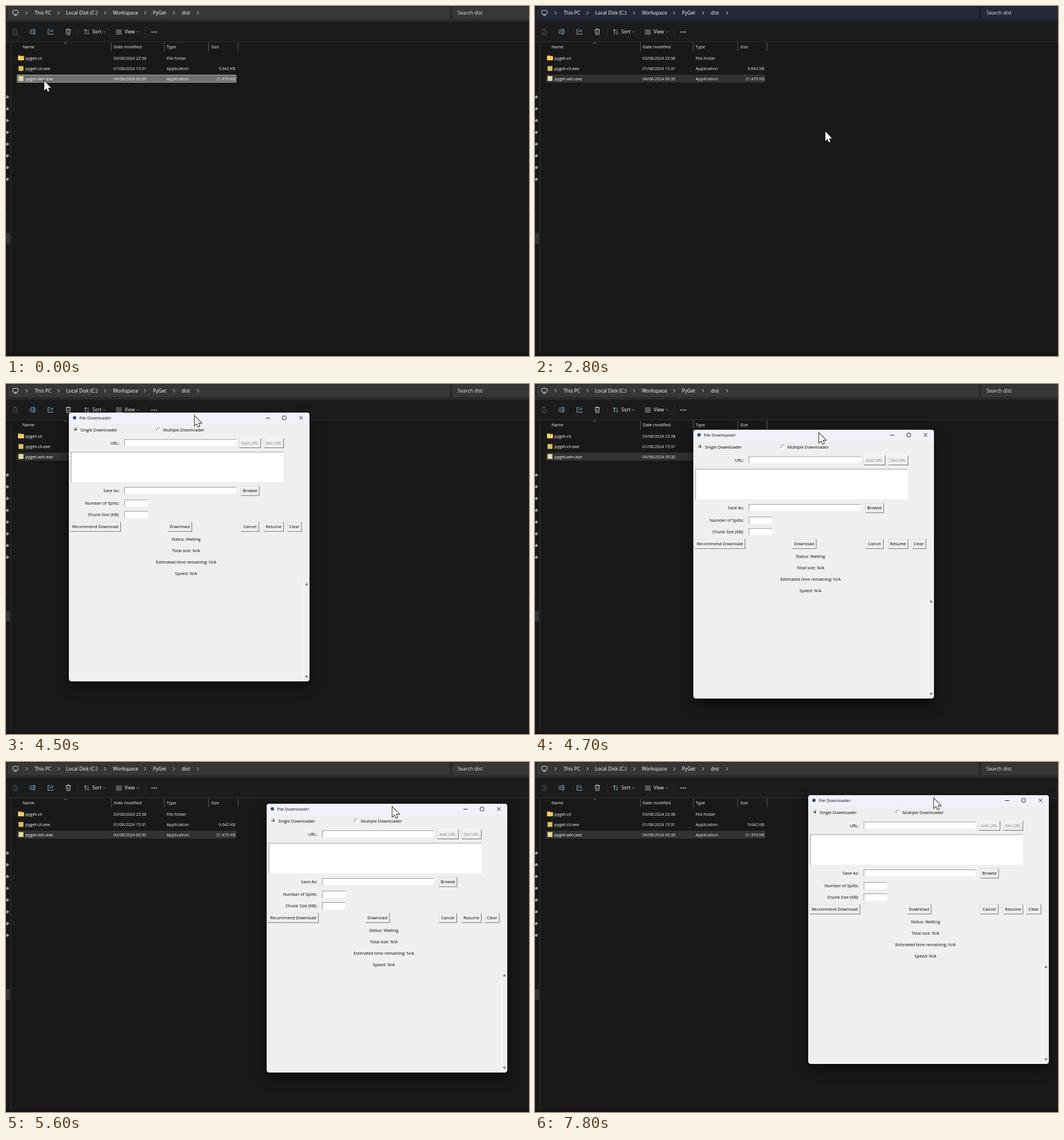
Recreate the animation shown at these times as an HTML page with a canvas. Size 915 by 612 pixels, loop 8 s.

```html
<!DOCTYPE html>
<html lang="en">
<head>
<meta charset="utf-8">
<title>File Downloader</title>
<style>
html, body { margin: 0; width: 100%; height: 100%; overflow: hidden; background: #191919; }
canvas { display: block; }
</style>
</head>
<body>
<canvas width="915" height="612"></canvas>
<script>
const c = document.querySelector('canvas').getContext('2d');
const LOOP = 8000, STEP = 100, WIN_W = 421, WIN_H = 470;

// Keyframes: [ms, x, y]
const windowPath = [[4200, -87.5, 10.5], [4300, -55, 17], [4500, 110, 50], [4700, 277, 80],
  [4900, 350, 80], [5100, 386, 79], [5300, 408, 78], [5600, 456, 73], [5800, 482, 70],
  [6000, 490, 71.5], [6300, 490, 72], [6600, 482.5, 66.5], [7500, 482.5, 66.5], [7800, 478, 58]];
const cursorPath = [[500, 67, 131], [700, 190, 150], [900, 410, 192], [1100, 500, 206],
  [1200, 500, 206], [1500, 508, 212], [2700, 508, 212], [2800, 508, 219.5], [3000, 495, 213],
  [3300, 330, 130], [3600, 166, 45], [3900, 133, 20], [4100, 134, 19], [4200, 134, 18]];

function along(path, t) {
  const i = path.findIndex(p => p[0] > t);
  if (i === 0) return path[0].slice(1);
  if (i < 0) return path[path.length - 1].slice(1);
  const a = path[i - 1], b = path[i], k = (t - a[0]) / (b[0] - a[0]);
  return [a[1] + (b[1] - a[1]) * k, a[2] + (b[2] - a[2]) * k];
}

const ramp = (t, a, b) => Math.min(1, Math.max(0, (t - a) / (b - a)));
const mix = (a, b, k) => `rgb(${a.map((v, i) => Math.round(v + (b[i] - v) * k))})`;

function rect(x, y, w, h, color) {
  c.fillStyle = color;
  c.fillRect(x, y, w, h);
}

function round(x, y, w, h, r, color) {
  c.fillStyle = color;
  c.beginPath();
  c.roundRect(x, y, w, h, r);
  c.fill();
}

function line(points, color, width = 1, close = false) {
  c.strokeStyle = color;
  c.lineWidth = width;
  c.beginPath();
  for (let i = 0; i < points.length; i += 2) c.lineTo(points[i], points[i + 1]);
  if (close) c.closePath();
  c.stroke();
}

function shape(points, color) {
  c.fillStyle = color;
  c.beginPath();
  for (let i = 0; i < points.length; i += 2) c.lineTo(points[i], points[i + 1]);
  c.fill();
}

function dot(x, y, r, color) {
  c.fillStyle = color;
  c.beginPath();
  c.arc(x, y, r, 0, 7);
  c.fill();
}

// y is the middle of the capitals
function text(s, x, y, size, color, align = 'left') {
  c.font = `${size}px "Open Sans", "Noto Sans", sans-serif`;
  c.fillStyle = color;
  c.textAlign = align;
  c.fillText(s, x, y + size * 0.36);
}

function outline(x, y, w, h, color) {
  c.strokeStyle = color;
  c.lineWidth = 1;
  c.beginPath();
  c.roundRect(x, y, w, h, 1.5);
  c.stroke();
}

function topBar(blue) {
  const field = mix([55, 55, 55], [37, 41, 54], blue);
  rect(0, 0, 915, 27, mix([43, 43, 43], [28, 32, 45], blue));
  round(4, 1, 772, 22, 3, field);
  round(781, 1, 140, 22, 3, field);
  outline(12, 7.5, 9, 7, '#ddd');
  line([14, 16.5, 19, 16.5], '#ddd');
  for (const x of [36, 92, 173.5, 243.5, 294, 336])
    line([x - 1.5, 9.2, x + 1.3, 12, x - 1.5, 14.8], '#ddd');
  const crumbs = [['This PC', 50], ['Local Disk (C:)', 105], ['Workspace', 187], ['PyGet', 257], ['dist', 307.5]];
  for (const [s, x] of crumbs) text(s, x, 12.3, 8.6, '#fff');
  text('Search dist', 790, 12.3, 8.6, '#e4e4e4');
}

function toolBar() {
  rect(0, 27, 915, 36, '#1c1c1c');
  rect(0, 27, 915, 1, '#232323');
  rect(0, 62, 915, 1, '#303030');
  outline(12, 41, 7, 9, '#4c4c4c');
  rect(14, 40, 3, 2, '#4c4c4c');
  outline(15.5, 44.5, 4.5, 6, '#34495f');

  outline(42, 41.5, 9, 7, '#5c9cc8');
  text('A', 43.3, 45, 6, '#ccc');
  line([49, 39.5, 49, 50.5], '#78b4dc');

  line([77, 41, 73.5, 41, 73.5, 49.5, 82, 49.5, 82, 47], '#8fa9bb');
  line([76, 47, 77, 44, 82, 43], '#5c9cc8');
  line([79.5, 40.5, 82.3, 43, 79.5, 45.5], '#5c9cc8');

  line([104.5, 41.5, 113.5, 41.5], '#ccc');
  line([107.5, 41, 107.5, 39.8, 110.5, 39.8, 110.5, 41], '#ccc', 0.8);
  line([105.5, 42, 106.3, 50, 111.7, 50, 112.5, 42], '#ccc');
  line([108, 44, 108, 48], '#ccc', 0.7);
  line([110, 44, 110, 48], '#ccc', 0.7);

  rect(126, 36, 1, 19, '#2d2d2d');
  line([139, 49.5, 139, 41], '#ccc');
  line([136.8, 43.2, 139, 41, 141.2, 43.2], '#ccc');
  line([143.5, 41, 143.5, 49.5], '#5c9cc8');
  line([141.3, 47.3, 143.5, 49.5, 145.7, 47.3], '#5c9cc8');
  text('Sort', 151, 45.3, 8.3, '#fff');
  for (let y = 41.5; y < 50; y += 2.4) rect(192.5, y, 10, 0.9, '#bbb');
  text('View', 207.5, 45.3, 8.3, '#fff');
  for (const x of [172, 230.5]) line([x - 2, 44.2, x, 46.2, x + 2, 44.2], '#999', 0.9);
  rect(243, 36, 1, 19, '#2d2d2d');
  for (const x of [255.5, 259.3, 263.1]) dot(x, 45.5, 1.1, '#eee');
}

function sideBar() {
  rect(8, 63, 1, 545, '#343434');
  rect(0, 608, 915, 4, '#141414');
  rect(0, 397, 7, 19, '#333');
  rect(0, 139, 2, 1, '#303030');
  rect(0, 365, 2, 1, '#303030');
  for (let i = 0; i < 8; i++) {
    const y = 159.5 + i * 20.55;
    shape([0, y - 1, 2.5, y - 3.5, 5.5, y - 0.5, 3, y + 2.5, 0, y + 1.5], '#999');
  }
}

function fileList(bright) {
  for (const x of [184, 276.5, 354, 405.5]) rect(x, 64, 1, 15, '#5c5c5c');
  line([102, 66, 104.3, 63.8, 106.6, 66], '#999', 0.9);
  const heads = [['Name', 29], ['Date modified', 188.5], ['Type', 281], ['Size', 359]];
  for (const [s, x] of heads) text(s, x, 71.2, 7.4, '#f4f4f4');

  round(19, 120, 384, 14, 1.5, mix([50, 50, 50], [112, 112, 112], bright));
  if (bright) outline(19.5, 120.5, 383, 13, `rgba(160,160,160,${bright})`);

  rect(21, 86.5, 5, 3, '#e0a82e');
  round(21, 87.5, 10.5, 7.5, 1, '#f7cf5c');
  rect(22, 105, 8.5, 8.5, '#e3bd4a');
  rect(22, 122.5, 8.5, 8.5, '#e9d9a0');

  const rows = [
    ['pyget-cli', '03/08/2024 23:38', 'File folder', ''],
    ['pyget-cli.exe', '01/08/2024 15:31', 'Application', '9.642 KB'],
    ['pyget-win.exe', '04/08/2024 00:30', 'Application', '21.470 KB']
  ];
  rows.forEach(([name, date, type, size], i) => {
    const y = 91.2 + i * 18;
    text(name, 34, y, 7.55, '#fff');
    text(date, 188, y, 7.1, '#f0f0f0');
    text(type, 281, y, 7.5, '#f0f0f0');
    text(size, 401, y, 7.1, '#f0f0f0', 'right');
  });
}

function entry(x, y, w, h) {
  rect(x, y, w, h, '#fff');
  rect(x, y, w, 1, '#9a9a9a');
  rect(x, y, 1, h, '#9a9a9a');
}

function button(s, x, y, w, color = '#000') {
  rect(x, y, w, 17, '#6a6a6a');
  rect(x, y, w - 1, 16, '#fff');
  rect(x + 1, y + 1, w - 2.5, 14.5, '#efefef');
  text(s, x + w / 2 - 0.5, y + 8.3, 7.42, color, 'center');
}

function radio(s, x, y, on) {
  dot(x, y, 3.6, '#fff');
  c.strokeStyle = '#666';
  c.lineWidth = 1;
  c.beginPath();
  c.arc(x, y, 3.3, Math.PI * 0.75, Math.PI * 1.75);
  c.stroke();
  if (on) dot(x, y, 1.5, '#000');
  text(s, x + 8, y + 0.7, 7.42, '#000');
}

function appWindow([x, y], alpha) {
  c.save();
  c.globalAlpha = alpha;
  c.translate(x, y);
  c.shadowColor = 'rgba(0,0,0,.55)';
  c.shadowBlur = 22;
  c.shadowOffsetY = 9;
  round(0, 0, WIN_W, WIN_H, 4.5, '#efefef');
  c.shadowColor = 'transparent';
  round(0, 0, WIN_W, 20, [4.5, 4.5, 0, 0], '#f0f1fa');

  dot(10, 9, 3, '#31506e');
  text('File Downloader', 18.3, 9.3, 7.42, '#111');
  line([344.5, 9.5, 351.5, 9.5], '#222');
  outline(373.7, 6, 6.3, 6.3, '#222');
  line([403.2, 6, 409.4, 12.2], '#222');
  line([409.4, 6, 403.2, 12.2], '#222');

  radio('Single Downloader', 12.3, 29.8, true);
  radio('Multiple Downloader', 156.7, 29.8, false);

  const labels = [['URL:', 53], ['Save As:', 136.5], ['Number of Splits:', 158.5], ['Chunk Size (KB):', 178.3]];
  for (const [s, ly] of labels) text(s, 88.5, ly, 7.42, '#000', 'right');
  entry(97, 46.5, 195.5, 12);
  entry(3.5, 68.5, 372, 53);
  entry(97, 130, 195.5, 12);
  entry(97, 152, 41, 12.5);
  entry(97, 172, 41, 12.5);

  button('Add URL', 298.5, 45, 37.5, '#888');
  button('Del URL', 341.5, 45, 34.5, '#888');
  button('Browse', 301.5, 128.5, 32);
  button('Recommend Download', 2.5, 191.3, 88.5);
  button('Download', 173, 191.3, 42.5);
  button('Cancel', 301.5, 191.3, 31.5);
  button('Resume', 341.5, 191.3, 34.5);
  button('Clear', 382.5, 191.3, 25);

  const info = ['Status: Waiting', 'Total size: N/A', 'Estimated time remaining: N/A', 'Speed: N/A'];
  info.forEach((s, i) => text(s, 205, 221.5 + i * 19.9, 7.42, '#000', 'center'));

  rect(410, 294, 1, 174, '#fff');
  shape([413, 302, 416, 297.5, 419, 302], '#858585');
  shape([413, 460, 416, 464.5, 419, 460], '#858585');
  c.restore();
}

function pointer([x, y]) {
  c.save();
  c.translate(x, y);
  const p = [0, 0, 0, 16.5, 3.8, 13, 6.2, 18.7, 8.8, 17.6, 6.4, 12, 11.6, 12];
  line(p, '#1a1a1a', 1.8, true);
  shape(p, '#fff');
  c.restore();
}

function draw(now) {
  const t = Math.floor(now % LOOP / STEP) * STEP;
  const blue = ramp(t, 0, 400) * (1 - ramp(t, 2800, 3200));
  const win = along(windowPath, t);
  rect(0, 0, 915, 612, '#191919');
  topBar(blue);
  toolBar();
  sideBar();
  fileList(1 - ramp(t, 0, 400));
  if (t >= 2900) appWindow(win, ramp(t, 2800, 3100));
  pointer(t > 4200 ? [win[0] + 220, win[1] + 6] : along(cursorPath, t));
  requestAnimationFrame(draw);
}
requestAnimationFrame(draw);
</script>
</body>
</html>
```
